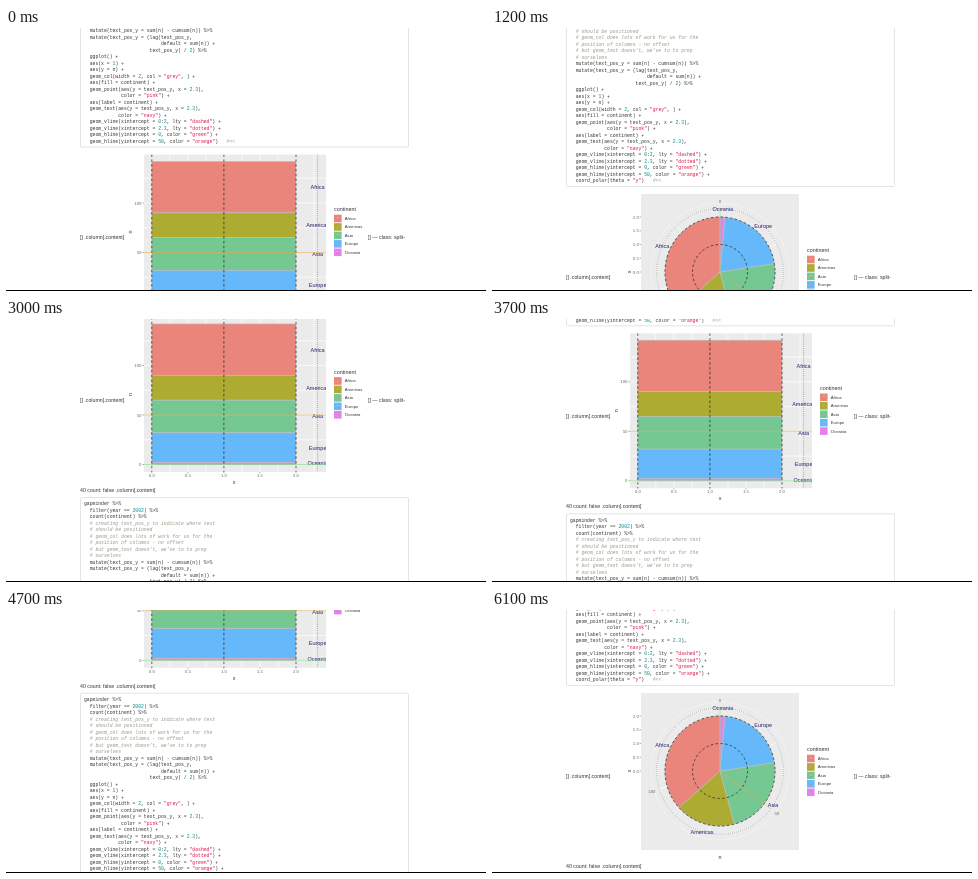
These frames come from a looping animation (480x263 px, 6.2 s). An HTML page:

```html
<!DOCTYPE html>
<html lang="en">
<head>
<meta charset="utf-8">
<title>Scrolling flipbook</title>
<style>
  html, body { margin: 0; width: 100%; height: 100%; overflow: hidden; background: #fff; }
  svg { display: block; width: 480px; height: 263px; }
  text { font-family: "Liberation Sans", Arial, sans-serif; fill: #333; white-space: pre; }
  .code { font: 4.75px "Liberation Mono", "Courier New", monospace; }
  .str { fill: #d14; }
  .num { fill: #088; }
  .com { fill: #998; font-style: italic; }
  .label { font-size: 5.5px; fill: #22226f; }
  .tick { font-size: 4.3px; fill: #666; }
  .dash { stroke: #222; stroke-width: .7; stroke-dasharray: 2.6 2.2; fill: none; }
  .dot { stroke: #555; stroke-width: .6; stroke-dasharray: .7 1.4; fill: none; }
  .grid { stroke: #fff; stroke-width: .7; fill: none; }
</style>
</head>
<body>
<svg viewBox="0 0 480 263">
  <defs>
    <clipPath id="panel"><rect x="138" y="-173" width="182" height="155"/></clipPath>
  </defs>
  <g id="page"></g>
  <rect y="262" width="480" height="1" fill="#000"/>
</svg>
<script>
const code = `gapminder %>%
  filter(year == 2002) %>%
  count(continent) %>%
  # creating text_pos_y to indicate where text
  # should be positioned
  # geom_col does lots of work for us for the
  # position of columns - no offset
  # but geom_text doesn't, we've to to prep
  # ourselves
  mutate(text_pos_y = sum(n) - cumsum(n)) %>%
  mutate(text_pos_y = (lag(text_pos_y,
                           default = sum(n)) +
                       text_pos_y) / 2) %>%
  ggplot() +
  aes(x = 1) +
  aes(y = n) +
  geom_col(width = 2, col = "grey", ) +
  aes(fill = continent) +
  geom_point(aes(y = text_pos_y, x = 2.3),
             color = "pink") +
  aes(label = continent) +
  geom_text(aes(y = text_pos_y, x = 2.3),
            color = "navy") +
  geom_vline(xintercept = 0:2, lty = "dashed") +
  geom_vline(xintercept = 2.3, lty = "dotted") +
  geom_hline(yintercept = 0, color = "green") +
  geom_hline(yintercept = 50, color = "orange") +
  coord_polar(theta = "y")   #<<`.split('\n');
const barCode = code.slice(0, 27);
barCode[26] = barCode[26].replace(' +', '   #<<');

const TOTAL = 142;
let rest = TOTAL;
const groups = [
  ['Africa', 52, '#e9857a'], ['Americas', 25, '#adab32'], ['Asia', 33, '#76c893'],
  ['Europe', 30, '#65b9fb'], ['Oceania', 2, '#e580ef']
].map(([name, n, color]) => {
  const g = { name, color, hi: rest, lo: rest - n, mid: rest - n / 2 };
  rest -= n;
  return g;
});

const esc = s => s.replace(/&/g, '&amp;').replace(/</g, '&lt;').replace(/>/g, '&gt;');
// Text whose middle sits at y
const text = (s, x, y, size, anchor = 'start', extra = '') =>
  `<text x="${x}" y="${y + size * .35}" font-size="${size}" text-anchor="${anchor}" ${extra}>${s}</text>`;
const label = (s, x, y) => text(s, x, y, 5.5, 'middle', 'class="label"');
const tick = (s, x, y, anchor = 'middle') => text(s, x, y, 4.3, anchor, 'class="tick"');
const turned = (s, x, y) => text(s, x, y, 5.4, 'middle', `transform="rotate(-90 ${x} ${y})"`);
const line = (x1, y1, x2, y2, attrs) =>
  `<line x1="${x1}" y1="${y1}" x2="${x2}" y2="${y2}" ${attrs}/>`;
const ring = (x, y, r, attrs) => `<circle cx="${x}" cy="${y}" r="${r}" ${attrs}/>`;
const rect = (x, y, w, h, attrs) =>
  `<rect x="${x}" y="${y}" width="${w}" height="${h}" ${attrs}/>`;

function highlight(s) {
  return s.split(/(#.*|"[^"]*"|\b\d+(?:\.\d+)?\b)/).map((part, i) => {
    if (i % 2 === 0) return esc(part);
    const kind = part[0] === '#' ? 'com' : part[0] === '"' ? 'str' : 'num';
    return `<tspan class="${kind}">${esc(part)}</tspan>`;
  }).join('');
}

function codeBox(lines, first) {
  const height = lines.length * 6.5 + 5.5;
  return rect(74.5, first - 6.5, 328, height, 'rx="1" fill="#fff" stroke="#ddd" stroke-width=".8"') +
    lines.map((s, i) =>
      `<text class="code" x="78" y="${first + i * 6.5 + 1.4}">${highlight(s)}</text>`).join('');
}

function legend(x, y) {
  return text('continent', x, y, 5.4) + groups.map((g, i) => {
    const cy = y + 9 + i * 8.45;
    return rect(x, cy - 3.8, 7.6, 7.6, `fill="${g.color}"`) +
      ring(x + 3.8, cy, .9, 'fill="#ffc0cb"') +
      text('a', x + 3.8, cy, 3.4, 'middle', 'opacity=".45"') +
      text(g.name, x + 10.8, cy, 4.2);
  }).join('');
}

const sides = y => text(']] .column[.content[', 74, y, 5.24) + text(']] — class: split-', 362, y, 5.24);
const heading = y => text('40 count: false .column[.content[', 74, y, 5.24);

function barChart() {
  const px = v => 145.8 + v * 72.1, py = v => -25.5 - v * .99;
  let s = rect(138, -173, 182, 155, 'fill="#ebebeb"');
  let inner = '';
  for (let v = 0; v <= 2.25; v += .25) inner += line(px(v), -173, px(v), -18, 'class="grid"');
  for (let v = 0; v <= 125; v += 25) inner += line(138, py(v), 320, py(v), 'class="grid"');
  for (const g of groups)
    inner += rect(px(0), py(g.hi), px(2) - px(0), py(g.lo) - py(g.hi),
      `fill="${g.color}" stroke="#bebebe" stroke-width=".6"`);
  for (const g of groups)
    inner += ring(px(2.3), py(g.mid), .9, 'fill="#ffc0cb"') + label(g.name, px(2.3), py(g.mid));
  for (const v of [0, 1, 2]) inner += line(px(v), -173, px(v), -18, 'class="dash"');
  inner += line(px(2.3), -173, px(2.3), -18, 'class="dot"');
  inner += line(138, py(0), 320, py(0), 'stroke="#7fd67f" stroke-width=".6"');
  inner += line(138, py(50), 320, py(50), 'stroke="#e8ac50" stroke-width=".6"');
  s += `<g clip-path="url(#panel)">${inner}</g>`;
  for (const v of [0, 50, 100])
    s += tick(v, 135.5, py(v), 'end') + line(136.6, py(v), 138, py(v), 'stroke="#555" stroke-width=".5"');
  for (let v = 0; v <= 2; v += .5)
    s += tick(v.toFixed(1), px(v), -14.5) + line(px(v), -18, px(v), -16.8, 'stroke="#555" stroke-width=".5"');
  return s + text('x', 228, -8, 5.4, 'middle') + turned('n', 124, -95.5) + legend(328, -118);
}

function polarChart() {
  const cx = 228, cy = 280.5, unit = 27.5;
  const at = (v, r) => {
    const a = v / TOTAL * 2 * Math.PI;
    return [cx + r * Math.sin(a), cy - r * Math.cos(a)];
  };
  const R = 2 * unit, far = 2.3 * unit;
  let s = rect(149, 202.5, 158, 157, 'fill="#ebebeb"');
  for (let v = 0; v < TOTAL; v += 25) s += line(cx, cy, ...at(v, far), 'class="grid"');
  s += ring(cx, cy, far, 'class="grid"') + ring(cx, cy, 69, 'class="grid" opacity=".5"');
  for (const g of groups) {
    const big = g.hi - g.lo > TOTAL / 2 ? 1 : 0;
    s += `<path d="M${cx} ${cy}L${at(g.lo, R)}A${R} ${R} 0 ${big} 1 ${at(g.hi, R)}Z" ` +
      `fill="${g.color}" stroke="#bebebe" stroke-width=".6"/>`;
  }
  for (const g of groups) {
    const [x, y] = at(g.mid, far);
    s += ring(x, y, .9, 'fill="#ffc0cb"') + label(g.name, x, y);
  }
  s += ring(cx, cy, unit, 'class="dash"') + ring(cx, cy, R, 'class="dash"');
  s += ring(cx, cy, far, 'class="dot"');
  s += line(cx, cy, ...at(0, far), 'stroke="#7fd67f" stroke-width=".6"');
  s += line(cx, cy, ...at(50, far), 'stroke="#e8ac50" stroke-width=".6"');
  for (const v of [0, 50, 100]) s += tick(v, ...at(v, 71));
  for (let v = 0; v <= 2; v += .5) {
    const y = cy - v * unit;
    s += tick(v.toFixed(1), 146.8, y, 'end') + line(147.6, y, 149, y, 'stroke="#555" stroke-width=".5"');
  }
  return s + turned('x', 137, cy) + text('n', cx, 366.5, 5.4, 'middle') + legend(315, 259);
}

const page = document.getElementById('page');
page.innerHTML = codeBox(barCode, -355) + barChart() + sides(-90) +
  heading(0) + codeBox(code, 14) + polarChart() + sides(285.5) + heading(375.5);

// Scroll offset by time in seconds, joined by a monotone cubic
const stops = [[0, 299.5], [.7, -10], [1.2, -36.5], [2.3, -73], [3, 171], [4.3, 192], [5.2, -97.5], [6.1, -119.5]];
const slope = i => (stops[i + 1][1] - stops[i][1]) / (stops[i + 1][0] - stops[i][0]);
const tangents = stops.map((_, i) => {
  if (i === 0 || i === stops.length - 1) return 0;
  const a = slope(i - 1), b = slope(i);
  return a * b <= 0 ? 0 : 2 * a * b / (a + b);
});

function offset(t) {
  let i = 0;
  while (i < stops.length - 2 && t > stops[i + 1][0]) i++;
  const [t0, y0] = stops[i], [t1, y1] = stops[i + 1];
  const h = t1 - t0, u = (t - t0) / h, w = 1 - u;
  return y0 * (1 + 2 * u) * w * w + y1 * u * u * (3 - 2 * u) +
    h * u * w * (tangents[i] * w - tangents[i + 1] * u);
}

const start = performance.now();
function draw() {
  const step = Math.floor((performance.now() - start) % 6200 / 100);
  page.setAttribute('transform', `translate(0 ${offset(step / 10).toFixed(2)})`);
  requestAnimationFrame(draw);
}
draw();
</script>
</body>
</html>
```
